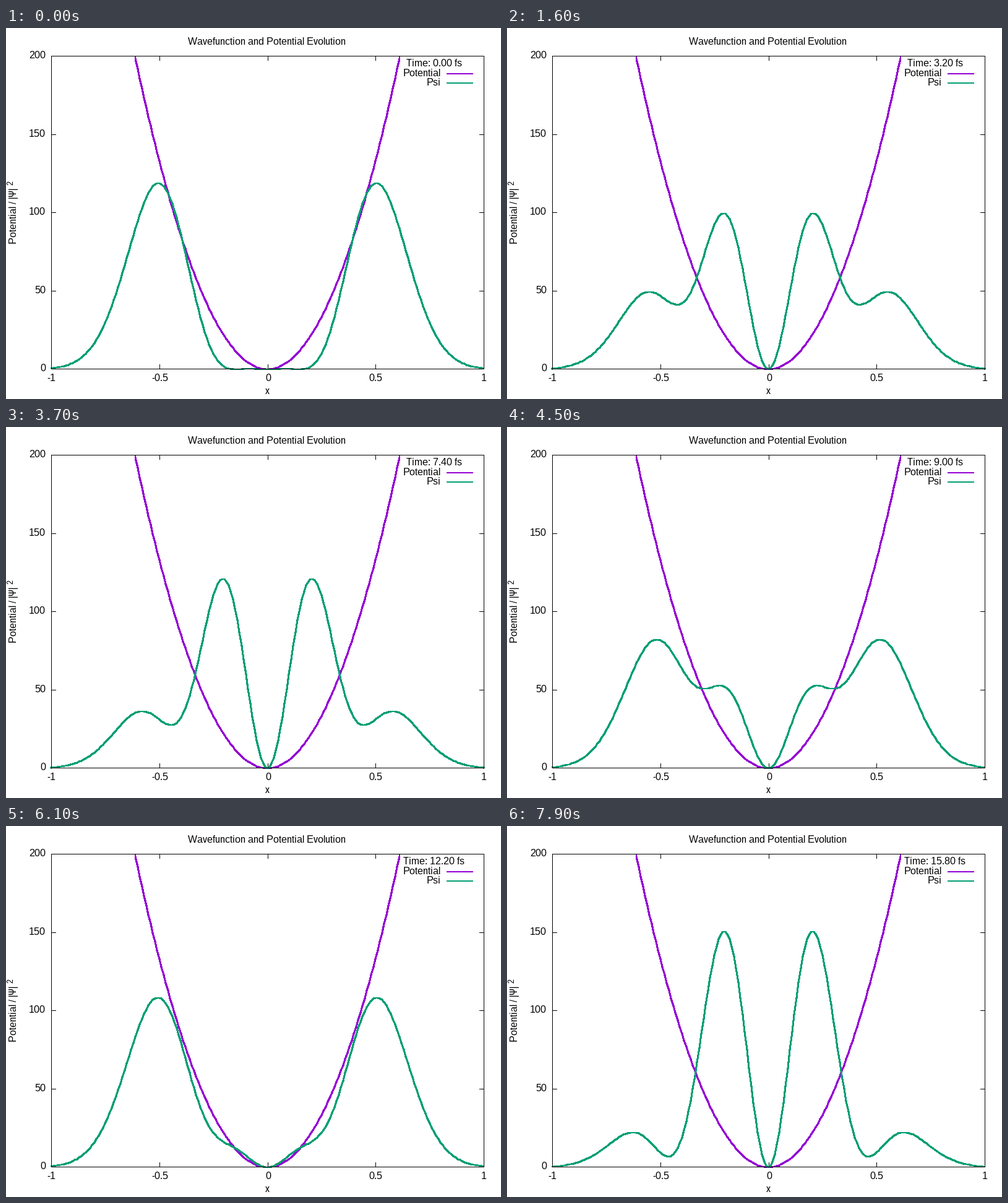
Recreate the animation shown at these times as a matplotlib script. Size 800 by 600 pixels, loop 8 s.

```python
import numpy as np
import matplotlib.pyplot as plt
from matplotlib.animation import FuncAnimation

plt.rcParams.update({
    "font.family": "Liberation Sans",
    "text.hinting": "native",
    "text.hinting_factor": 1,
    "path.simplify": False,
    "path.snap": False,
    "axes.unicode_minus": False,
})

W, H, DPI = 800, 600, 100
FRAMES, INTERVAL, DT = 80, 100, 0.2      # DT in fs per frame
LEFT, RIGHT, TOP, BOTTOM = 73, 772, 45, 551
V_MAX = 200
PURPLE, GREEN = "#9400d3", "#009e73"
PX = 72 / DPI                            # points per pixel

# Oscillator of 1500 cm^-1 with the proton mass, in atomic units
OMEGA = 1500 / 219474.63
WIDTH = 1 / np.sqrt(1836.15 * OMEGA)
BEAT = 2 * OMEGA / 0.0241888             # rad per fs between n=1 and n=3
DENSITY = 80 / (2 * np.sqrt(np.pi) * WIDTH)
STIFFNESS = 533.5

fig = plt.figure(figsize=(W / DPI, H / DPI), dpi=DPI, facecolor="white")
ax = fig.add_axes([0, 0, 1, 1])
ax.set_xlim(0, W)
ax.set_ylim(H, 0)
ax.axis("off")


def col(x):
    return np.floor(LEFT + (x + 1) / 2 * (RIGHT - LEFT) + 0.5)


def row(v):
    return np.floor(BOTTOM - v / V_MAX * (BOTTOM - TOP) + 0.5)


def line(xs, ys, color="black", width=1, z=2):
    return ax.plot(xs, ys, color=color, lw=width * PX, antialiased=False,
                   solid_capstyle="projecting", solid_joinstyle="miter" if width == 1 else "round",
                   snap=False, zorder=z)[0]


def curve(x, v, color, z):
    # the two-pixel pen covers the cell below and to the left of each point
    return line(col(x), row(v) + 1, color, 2, z)


def label(x, y, s, ha="center", size=16, rotation=0):
    return ax.text(x, y, s, ha=ha, va="baseline", fontsize=size * PX,
                   rotation=rotation, rotation_mode="anchor", zorder=6)


def density(x, t):
    y = x / WIDTH
    a = np.sqrt(2) * y
    b = (2 * y**3 - 3 * y) / np.sqrt(3)
    return DENSITY * np.exp(-y**2) * (a**2 + b**2 + 2 * a * b * np.cos(BEAT * t))


def draw_frame():
    x0, x1, y0, y1 = LEFT + 0.5, RIGHT + 0.5, TOP + 0.5, BOTTOM + 0.5
    line([x0, x1, x1, x0, x0], [y0, y0, y1, y1, y0], z=5)
    for x in (-1, -0.5, 0, 0.5, 1):
        c = col(x) + 0.5
        line([c, c], [y1, y1 - 7], z=1)
        line([c, c], [y0, y0 + 7], z=1)
        label(c, 571, f"{x:g}")
    for v in (0, 50, 100, 150, 200):
        r = row(v) + 0.5
        line([x0, x0 + 7], [r, r], z=1)
        line([x1, x1 - 7], [r, r], z=1)
        label(64, r + 3.5, str(v), ha="right")


def draw_labels():
    label(421.5, 27, "Wavefunction and Potential Evolution")
    label(422, 592, "x")
    label(17, 349, "Potential / |Ψ|", ha="left", rotation=90)
    label(11, 254, "2", ha="left", size=12.8, rotation=90)
    for name, base, color in (("Potential", 78, PURPLE), ("Psi", 93, GREEN)):
        label(703, base, name, ha="right")
        line([713, 754], [base - 4] * 2, color, 2, z=4)


grid = np.linspace(-1, 1, 201)
edge = np.sqrt(V_MAX / STIFFNESS)
well = np.concatenate(([-edge], grid[np.abs(grid) < edge], [edge]))

draw_frame()
draw_labels()
curve(well, STIFFNESS * well**2, PURPLE, 2)
psi = curve(grid, density(grid, 0), GREEN, 3)
clock = label(692, 62, "Time: 0.00 fs")


def update(i):
    t = i * DT
    psi.set_ydata(row(density(grid, t)) + 1)
    clock.set_text(f"Time: {t:.2f} fs")
    return psi, clock


anim = FuncAnimation(fig, update, frames=FRAMES, interval=INTERVAL,
                     repeat=True, repeat_delay=0, blit=False)
plt.show()
```
